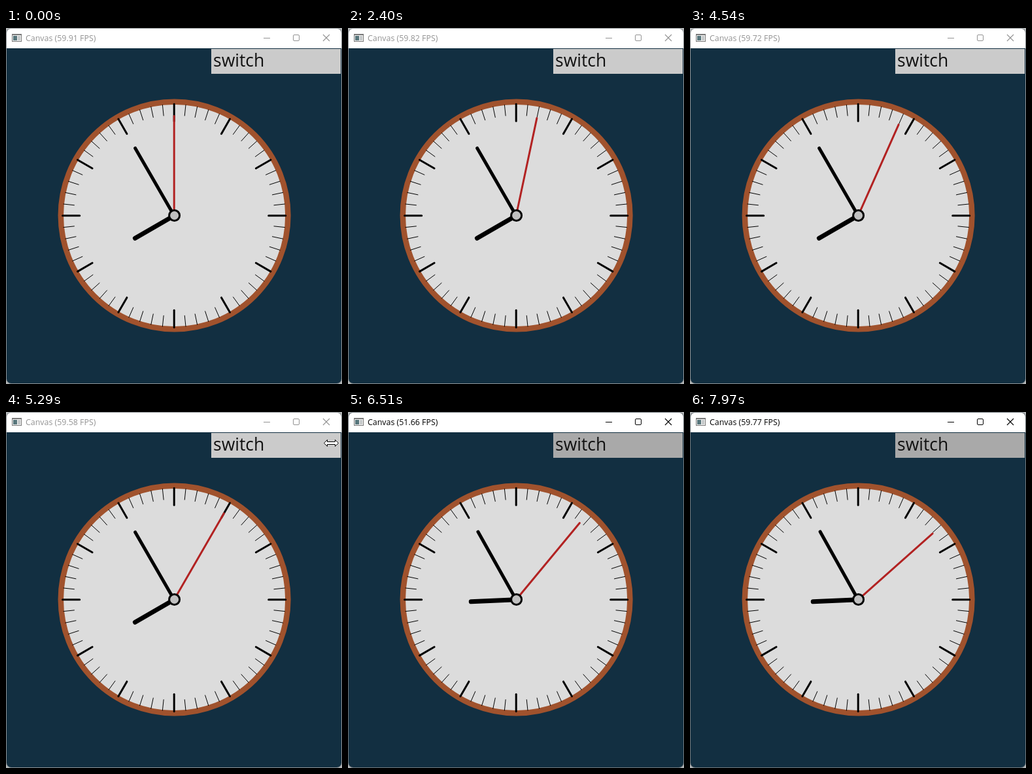
An HTML page with a canvas that plays this animation: 514 by 544 pixels, repeating every 8000 ms.

```html
<!DOCTYPE html>
<html lang="en">
<head>
<meta charset="utf-8">
<title>Clock</title>
<style>
html, body { margin: 0; width: 100%; height: 100%; overflow: hidden; background: #b4b7b8; }
canvas { display: block; }
</style>
</head>
<body>
<canvas id="stage" width="514" height="544"></canvas>
<script>
const ctx = document.getElementById('stage').getContext('2d');
const LOOP = 8000, CLICK = 6170, HOVER = 5360, TAU = Math.PI * 2;
const CX = 257.2, CY = 286.8;

// [start in ms, displayed rate]
const RATES = [
  [0, '59.91'], [70, '59.88'], [400, '59.76'], [540, '59.83'], [870, '60.02'], [1070, '59.87'],
  [1410, '59.94'], [1530, '59.81'], [1730, '59.78'], [1930, '59.92'], [2200, '59.86'],
  [2400, '59.82'], [2750, '60.01'], [3070, '59.84'], [3400, '59.75'], [3530, '59.69'],
  [3870, '60.03'], [4540, '59.72'], [5090, '59.63'], [5290, '59.58'], [5430, '58.94'],
  [5630, '59.74'], [5830, '59.85'], [6170, '59.32'], [6370, '51.66'], [6640, '57.48'],
  [6900, '59.86'], [7030, '60.00'], [7370, '59.83'], [7580, '60.04'], [7780, '59.77']
];

function rect(color, x, y, w, h) {
  ctx.fillStyle = color;
  ctx.fillRect(x, y, w, h);
}

function path(color, width, points) {
  ctx.strokeStyle = color;
  ctx.lineWidth = width;
  ctx.beginPath();
  for (const [x, y] of points) ctx.lineTo(x, y);
  ctx.stroke();
}

function disc(fill, stroke, width, r) {
  ctx.beginPath();
  ctx.arc(CX + 0.4, CY - 0.3, r, 0, TAU);
  ctx.fillStyle = fill;
  ctx.fill();
  ctx.strokeStyle = stroke;
  ctx.lineWidth = width;
  ctx.stroke();
}

// Line along a clock direction; turn is a fraction of the full circle.
function spoke(turn, from, to, width, color = '#000', cap = 'butt') {
  const sin = Math.sin(turn * TAU), cos = Math.cos(turn * TAU);
  ctx.lineCap = cap;
  path(color, width, [from, to].map(r => [CX + r * sin, CY - r * cos]));
  ctx.lineCap = 'butt';
}

function label(text, x, y, size, color) {
  ctx.font = `${size}px "Open Sans", "Noto Sans", sans-serif`;
  ctx.fillStyle = color;
  ctx.fillText(text, x, y);
}

function drawWindow(t) {
  const active = t >= CLICK, ink = active ? '#000' : '#939393';
  rect('#b4b7b8', 0, 0, 514, 544);
  ctx.beginPath();
  ctx.roundRect(0, 0, 514, 544, 8);
  ctx.fillStyle = active ? '#70777c' : '#8d9295';
  ctx.fill();
  ctx.save();
  ctx.beginPath();
  ctx.roundRect(1, 1, 512, 542, 7);
  ctx.clip();
  rect('#fff', 1, 1, 512, 30);
  rect('#122f41', 1, 31, 512, 512);
  ctx.restore();

  rect('#777', 9, 9, 15, 12);
  rect('#f4f4f4', 10, 11, 13, 9);
  rect('#58767c', 11, 12, 6, 7);
  rect('#c5c9ca', 18, 12, 4, 7);

  const rate = RATES.findLast(r => r[0] <= t)[1];
  label(`Canvas (${rate} FPS)`, 30, 20, 12.4, ink);
  path(ink, 1, [[394, 15.5], [404, 15.5]]);
  ctx.beginPath();
  ctx.roundRect(439.5, 10.5, 9, 9, 1.5);
  ctx.stroke();
  path(ink, 1.1, [[485, 10], [495, 20]]);
  path(ink, 1.1, [[495, 10], [485, 20]]);
}

function drawClock(t) {
  const now = t / 1000 + 0.1, smooth = t >= CLICK;
  const sec = smooth ? now : Math.floor(now - 0.03);
  const min = smooth ? 55 + sec / 60 : 55;
  const hour = smooth ? 8 + min / 60 : 8;

  disc('#dcdcdc', '#a0522d', 8.5, 173.8);
  for (let i = 0; i < 60; i++) {
    if (i % 5) spoke(i / 60, 153.2, 170.6, 1);
    else spoke(i / 60, 144.5, 170.6, 3, '#000', 'round');
  }
  spoke(hour / 12, 0, 69, 7, '#000', 'round');
  spoke(min / 60, 0, 119, 5, '#000', 'round');
  spoke(sec / 60, 0, 152.3, 3, '#b22222', 'round');
  disc('#c0c0c0', '#000', 3, 8);
}

function drawCursor(x, y) {
  const half = [[-11, 0], [-6, -5], [-6, -2], [6, -2], [6, -5], [11, 0]];
  ctx.beginPath();
  for (const [dx, dy] of half) ctx.lineTo(x + dx, y + dy);
  for (const [dx, dy] of half.slice(1, -1).reverse()) ctx.lineTo(x + dx, y - dy);
  ctx.closePath();
  ctx.fillStyle = '#fff';
  ctx.fill();
  ctx.strokeStyle = '#000';
  ctx.lineWidth = 1;
  ctx.stroke();
}

function draw(t) {
  drawWindow(t);
  rect(t >= HOVER ? '#a9a9a9' : '#cbcbcb', 314, 32, 198, 38);
  label('switch', 317, 59, 26.5, '#111');
  drawClock(t);
  if (t >= 5090 && t < HOVER) drawCursor(497.5 + Math.max(0, 5290 - t) * 0.03, 47.5);
}

const start = performance.now();
function frame() {
  draw((performance.now() - start) % LOOP);
  requestAnimationFrame(frame);
}
frame();
</script>
</body>
</html>
```
